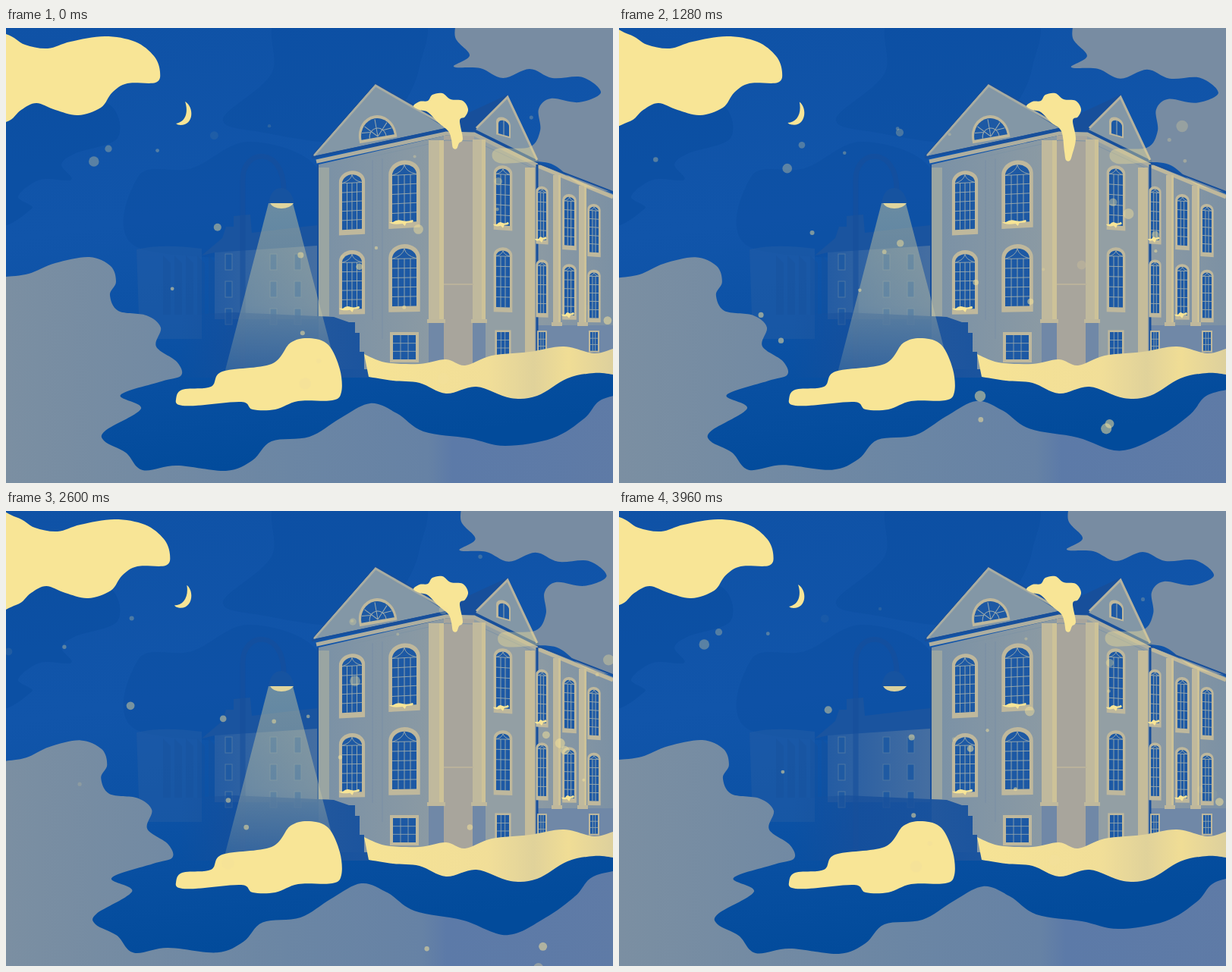
These frames come from a looping animation (800x600 px, 4 s). An HTML page:

```html
<!DOCTYPE html>
<html lang="en">
<head>
<meta charset="utf-8">
<title>Winter night</title>
<style>
  html, body { margin: 0; width: 100%; height: 100%; overflow: hidden; background: #0d51a5; }
  svg { display: block; width: 100vw; height: 100vh; }
</style>
</head>
<body>
<svg id="stage" viewBox="0 0 800 600" preserveAspectRatio="none"></svg>
<script>
const LOOP = 4000;
const YELLOW = '#f8e596', CREAM = '#bfb89c', BLUE = '#1d59a4', DARK = '#174f9b', GRAY = '#788ca2', PLINTH = '#7088a7';

const points = text => text.split(' ').map(pair => pair.split(',').map(Number));

// Catmull-Rom curve through [x, y] points
function smooth(pts, closed = true) {
  const n = pts.length;
  const at = i => pts[closed ? (i + n) % n : Math.max(0, Math.min(n - 1, i))];
  let d = 'M' + at(0);
  for (let i = 0; i < (closed ? n : n - 1); i++) {
    const [a, b, c, e] = [at(i - 1), at(i), at(i + 1), at(i + 2)];
    const near = b.map((v, k) => v + (c[k] - a[k]) / 6);
    const far = c.map((v, k) => v - (e[k] - b[k]) / 6);
    d += `C${near} ${far} ${c}`;
  }
  return d + (closed ? 'Z' : '');
}
const shape = (d, fill, more = '') => `<path d="${d}" fill="${fill}" ${more}/>`;
const blob = (text, fill, more) => shape(smooth(points(text)), fill, more);
const poly = (text, fill, more = '') => `<polygon points="${text}" fill="${fill}" ${more}/>`;
const box = (x, y, w, h, fill, more = '') =>
  `<rect x="${x}" y="${y}" width="${w}" height="${h}" fill="${fill}" ${more}/>`;
const line = (d, color, width = 1, more = '') =>
  `<path d="${d}" fill="none" stroke="${color}" stroke-width="${width}" ${more}/>`;
const gradient = (id, dir, ...stops) => `<linearGradient id="${id}" ${dir}>` +
  stops.map(([at, color, o = 1]) => `<stop offset="${at}" stop-color="${color}" stop-opacity="${o}"/>`).join('') +
  '</linearGradient>';

function arch(x, y, w, h) {
  const r = w * .42;
  return `M${x} ${y + h}V${y + r}A${w / 2} ${r} 0 0 1 ${x + w} ${y + r}V${y + h}Z`;
}
function archedWindow(x, y, w, h, skew) {
  const r = w * .42, cols = w > 20 ? 4 : 3, rim = w * .1 + 1.5;
  let grid = '';
  for (let i = 1; i < cols; i++) grid += `M${w * i / cols} ${r}V${h}`;
  for (let i = 0; i < 5; i++) grid += `M0 ${r + (h - r) * i / 5}H${w}`;
  grid += `M0 ${r}Q${w * .45} ${r * .7} ${w / 2} 0Q${w * .55} ${r * .7} ${w} ${r}`;
  return `<g transform="translate(${x} ${y}) skewY(${skew})">` +
    shape(arch(-rim, -rim - 1, w + 2 * rim, h + 2 * rim + 4), CREAM) +
    shape(arch(0, 0, w, h), BLUE) + line(grid, '#9eabab', .9) + '</g>';
}
function plainWindow(x, y, w, h) {
  const rim = w * .1 + 1;
  return box(x - rim, y - rim, w + 2 * rim, h + 2 * rim, CREAM) + box(x, y, w, h, BLUE) +
    line(`M${x + w / 3} ${y}v${h}M${x + w * 2 / 3} ${y}v${h}M${x} ${y + h / 3}h${w}M${x} ${y + h * 2 / 3}h${w}`, '#9eabab', .8);
}
const pilaster = (x, top, w, bottom) =>
  box(x, bottom, w, 446 - bottom, PLINTH) + box(x, top, w, bottom - top, '#c0b99d') +
  box(x + w * .7, top, w * .3, bottom - top, '#cdc298') + box(x - 2, bottom - 4, w + 4, 5, CREAM);
const sillSnow = (x, y, w) =>
  shape(`M${x} ${y}q${w * .2} -4 ${w * .45} -2t${w * .5} -1q4 4 -${w * .3} 4l-2 4l-3 -3q-${w * .5} 2 -${w * .65} -2Z`, YELLOW);

// Window columns shrink towards a horizon at street level
const HORIZON = 440;
const columns = [
  { x: 443, w: 26, scale: .95, skew: -3, snowRow: 1 },
  { x: 509, w: 32, scale: 1, skew: -3, snowRow: 0, cellar: true },
  { x: 646, w: 18, scale: .985, skew: 4, snowRow: 0, cellar: true },
  { x: 701, w: 11, scale: .88, skew: 4, snowRow: 0, cellar: true },
  { x: 736, w: 13, scale: .84, skew: 4, snowRow: 1 },
  { x: 769, w: 12, scale: .79, skew: 4, cellar: true }
];
function windowColumn({ x, w, scale, skew, snowRow, cellar }) {
  let out = cellar ? plainWindow(x + 1, 405 - 4 * (w < 20), w - 2, 35 * scale - 3) : '';
  [259, 149].forEach((rise, row) => {
    const y = HORIZON - rise * scale, h = 76 * scale;
    out += archedWindow(x, y, w, h, row ? skew / 3 : skew);
    if (row === snowRow) out += sillSnow(x + 1, y + h - 1, w * .85);
  });
  return out;
}

const defs = `<defs>` +
  gradient('sky', 'x2=".2" y2="1"', [0, '#0f52a6'], [.45, '#1155aa'], [.72, '#0b51a4'], [1, '#024b9b']) +
  gradient('mist', '', [0, '#7b8fa2'], [.45, '#6b86a4'], [.67, '#6682a5'], [.71, '#5c7aa8'], [1, '#5f7ba6']) +
  gradient('beam', 'x2="0" y2="1"', [0, '#e9dc9e', .42], [.6, '#d8d2a4', .36], [1, '#d8d2a4', .16]) +
  gradient('street', '', [0, '#245ca3'], [1, '#456ea1']) +
  gradient('steps', '', [0, DARK, 0], [.35, DARK, .8], [1, '#1b549e']) +
  gradient('wall', '', [0, '#7a91a6'], [1, '#8d9ba3']) +
  gradient('wing', '', [0, '#8c9aa3'], [1, '#7c91a4']) +
  gradient('ground', '', [0, '#f6e395'], [.5, '#f1de98'], [.68, '#e0d29a'], [.82, '#f0dd95'], [1, '#ddd09d']) +
  `<clipPath id="house"><path d="M403 170L487 73L580 128L661 88L703 178L800 222V440H412V180Z"/></clipPath></defs>`;

const sky = () => box(0, 0, 800, 600, 'url(#sky)') +
  blob('-20,60 60,90 135,100 147,145 92,165 73,180 86,200 45,200 16,222 34,238 -20,250', '#07499b', 'opacity=".4"') +
  blob('365,-20 540,-20 545,50 515,110 450,150 340,138 286,120 350,60', '#07499b', 'opacity=".3"') +
  blob('175,195 245,185 320,150 410,185 410,290 175,290', '#0b4c9e', 'opacity=".35"');

function distance() {
  let out = shape('M172 292Q205 284 258 291V410H176Z', '#265ea4', 'opacity=".45"');
  for (let x = 207; x < 275; x += 15) out += poly(`${x},300 ${x + 10},310 ${x + 10},378 ${x},378`, DARK, 'opacity=".35"');
  out += poly('258,300 285,277 290,262 300,262 300,248 322,246 324,270 410,260 410,292 275,296', '#1a549f') +
    poly('275,296 410,287 410,384 275,384', 'url(#street)');
  for (const x of [289, 348, 380]) for (let y = 298; y < 380; y += 36)
    out += box(x, y, 9, 21, '#1f5aa2', 'stroke="#4d77a3"');
  return out + line('M312 450V200C312 158 366 156 366 213', DARK, 7, 'opacity=".6"') +
    shape('M346 231Q349 211 363 211Q376 212 380 231Z', '#1a559f', 'opacity=".7"') +
    shape('M348 231H379Q374 238 363 238Q352 238 348 231', '#d9d09d');
}
const steps = () => poly('228,379 300,375 410,380 432,381 452,388 460,388 460,402 466,402 466,427 472,427 472,450 478,450 478,461 228,461', 'url(#steps)');

function house() {
  return poly('403,168 487,73 581,125 661,88 703,178 617,140', DARK) +
    poly('699,178 800,219 800,436 699,436', 'url(#wing)') + box(699, 392, 101, 44, PLINTH) +
    line('M701 182L800 223', CREAM, 5) + line('M701 178L800 216', DARK, 2) +
    poly('412,180 578,142 578,450 412,450', 'url(#wall)') +
    poly('577,142 617,140 617,450 577,450', '#a8a59c') +
    poly('617,140 699,180 699,440 617,450', '#939fa4') +
    // gables and cornice
    poly('405,169 487,75 580,132', '#8397a6') +
    line('M406 168L487 76L578 128', '#a9ada2', 3) + line('M403 169L487 73L580 125', DARK, 1) +
    poly('619,134 661,90 700,174', '#8397a6') + line('M620 132L661 91L700 174', '#b6b39f', 3) +
    line('M403 171L580 133L617 135L704 180', DARK, 2.5) +
    line('M409 176L580 139L617 140L700 181', '#aeae9f', 5) +
    line('M412 185L580 148L617 149L697 186', '#7f94a4', 1) +
    // wall divisions
    box(412, 184, 14, 196, '#9aa5a2') + line('M496 172V410M483 174V385', PLINTH, 1, 'opacity=".5"') +
    pilaster(557, 148, 20, 388) + pilaster(615, 147, 17, 388) + box(684, 184, 13, 256, '#c5bc9a') +
    pilaster(721, 194, 10, 392) + pilaster(755, 208, 10, 392) +
    line('M577 338H616', '#bab29b', 2) + line('M700 180V426', DARK, 3) + line('M411 180V381', DARK, 2) +
    columns.map(windowColumn).join('') +
    // gable lights
    '<g transform="translate(490 143) rotate(-10)">' +
    shape('M-25 5V0A25 28 0 0 1 25 0V5Z', CREAM) + shape('M-22 1A22 25 0 0 1 22 1Z', BLUE) +
    line('M-11 1A11 12 0 0 1 11 1M0 0V-23M0 0L-15 -16M0 0L15 -16M-8 -7L-20 -8M8 -7L20 -8', '#9eabab') + '</g>' +
    '<g transform="translate(656 142) skewY(16)">' + shape(arch(-10, -24, 19, 25), CREAM) +
    shape(arch(-7, -20, 14, 19), BLUE) + line('M0 -20V-1', '#9eabab') + '</g>';
}

const cornerCloud = smooth(points('596,-20 592,12 611,36 590,51 625,53 655,66 690,54 720,66 760,65 784,85 755,98 718,93 702,107 ' +
  '704,135 690,157 645,160 650,178 715,178 760,208 830,220'), false) + 'V-20Z';
const brightCloud = '-45,2 0,8 25,22 55,27 85,18 130,11 170,18 195,37 203,58 197,72 160,73 140,85 125,105 95,115 65,108 40,99 20,108 0,124 -45,127';
const snowTop = smooth(points('472,430 500,441 545,443 580,437 605,445 640,432 690,427 735,420 775,429 800,423'), false);
const snowFoot = smooth(points('800,457 775,455 740,462 700,485 665,488 620,473 580,482 545,468 510,465 478,460'), false);

document.getElementById('stage').innerHTML = defs + sky() +
  shape(cornerCloud, GRAY, 'class="corner"') + distance() + house() + steps() +
  poly('346,231 378,231 437,455 288,455', 'url(#beam)', 'id="beam"') +
  `<g clip-path="url(#house)">${shape(cornerCloud, '#f3df94', 'class="corner" opacity=".38"')}</g>` +
  shape(snowTop + snowFoot.replace('M', 'L') + 'Z', 'url(#ground)') +
  shape('', 'url(#mist)', 'id="mistCloud"') +
  blob('224,490 232,477 270,473 285,453 350,443 375,415 400,409 425,418 440,450 442,480 430,491 385,492 355,503 325,503 310,493 250,498 228,497', YELLOW) +
  blob(brightCloud, YELLOW, 'id="bright"') +
  shape('M236 97C248 104 248 128 230 128Q226 128 224 126C236 124 241 112 236 97Z', YELLOW, 'id="moon"') +
  shape('', YELLOW, 'id="roofSnow"') + shape('M0 -6C5 -4 7 4 2 6C-6 6 -7 -4 0 -6Z', YELLOW, 'id="drop"') +
  '<g id="snow" fill="#f2e09a"></g>';

const mist = points('0,328 30,324 65,310 110,302 138,314 145,335 137,352 148,373 185,379 204,395 198,420 225,440 231,458 205,466 ' +
  '151,484 178,502 131,531 130,545 158,560 180,583 225,577 290,584 325,570 350,545 400,539 440,515 480,495 515,508 550,532 ' +
  '610,541 658,551 720,541 762,515 785,490 830,480');

// The mist slides left, held at the stage edge, while its lowest bay sinks
function mistPath(drift) {
  return smooth(mist.map(([x, y]) => {
    const bay = Math.exp(-(((x - 660) / 45) ** 2));
    return [x + drift * (17 * bay - 14 * Math.min(1, x / 100)), y + drift * (17 * bay + 2 - .014 * x)];
  }), false) + 'V600H0Z';
}

let seed = 11;
const random = () => (seed = seed * 16807 % 2147483647) / 2147483647;
const flakes = Array.from({ length: 30 }, () => ({
  x: -100 + 850 * random(), y: 20 + 480 * random(), r: 2 + 6 * random() ** 1.3, phase: random(), lift: random()
}));

// Wind carries flakes across on the left; they fall more steeply on the right
function flakeAt({ x, y, r, phase, lift }, time) {
  const u = (time + phase) % 1, across = (x + 100) / 850;
  const cx = x + (360 - 220 * across) * u * (1.2 - .2 * u);
  const cy = y + (320 * across - 120 * lift) * u + 100 * u * (u - 1) * (1 - across);
  const fade = Math.min(1, 10 * u, 10 * (1 - u));
  const opacity = fade * Math.max(.2, Math.min(.55, .2 + (cy - 100) / 600));
  return `<circle cx="${cx}" cy="${cy}" r="${r * (1.05 - .2 * u)}" opacity="${opacity}"/>`;
}

const part = id => document.getElementById(id);
const move = (element, transform) => element.setAttribute('transform', transform);
const show = (element, visible) => { element.style.display = visible ? '' : 'none'; };
const corners = document.querySelectorAll('.corner');

function draw(now) {
  const ms = now % LOOP, s = ms / 1000;
  const drift = .5 - .5 * Math.cos(2 * Math.PI * (ms - 80) / LOOP);
  const slide = 18.7 * (1 - Math.abs(2 * ms / LOOP - 1));

  part('mistCloud').setAttribute('d', mistPath(drift));
  corners.forEach(c => move(c, `translate(${9 * drift} ${drift})`));
  move(part('bright'), `translate(${slide} 0)`);
  move(part('moon'), `rotate(${11 * drift} 232 112)`);
  show(part('beam'), ms < 3940);

  // The drip stretches, lets go and falls
  const release = 1.4, tip = s < release ? 159 + 12.5 * s : 159;
  part('roofSnow').setAttribute('d', smooth(points('537,103 545,97 556,96 562,88 575,86 586,94 602,96 609,107 605,117 598,122 602,146 ' +
    `597,${tip - 7} 594,${tip} 589,${tip - 1} 587,${tip - 12} 583,136 570,125 556,111 545,108`)));
  const dropY = 172 + 600 * (s - release) ** 2;
  move(part('drop'), `translate(591 ${dropY})`);
  show(part('drop'), s >= release && dropY < 440);

  part('snow').innerHTML = flakes.map(f => flakeAt(f, ms / LOOP)).join('');
}

const begin = performance.now();
function tick() {
  draw(performance.now() - begin);
  requestAnimationFrame(tick);
}
tick();
</script>
</body>
</html>
```
